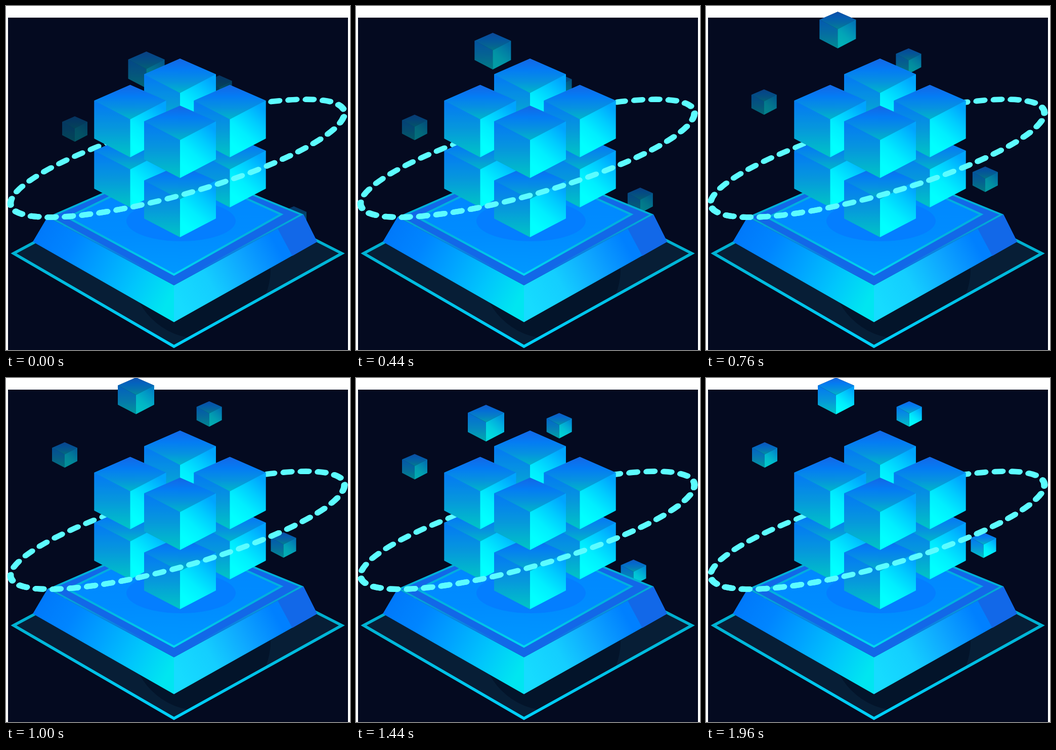
Animation, 680 px wide and 680 px high, one loop 2000 ms. Source, as an HTML page with a canvas:

```html
<!DOCTYPE html>
<html lang="en">
<head>
<meta charset="utf-8">
<title>Isometric cubes</title>
<style>
  html, body { margin: 0; width: 100%; height: 100%; overflow: hidden; background: #fff; }
  canvas { display: block; width: 680px; height: 680px; }
</style>
</head>
<body>
<canvas id="stage" width="680" height="680"></canvas>
<script>
const ctx = document.getElementById('stage').getContext('2d');
const LOOP = 2000, STEP = 40, HALF = 1000;
const NIGHT = '#040a20', HAZE = '#042438', TEAL = '#00b2d6', ROYAL = '#1268e8';

const clamp = v => Math.max(0, Math.min(1, v));
const mix = (a, b, p) => a + (b - a) * p;

function trace(points) {
  ctx.beginPath();
  points.forEach(([x, y]) => ctx.lineTo(x, y));
  ctx.closePath();
}

function fill(points, paint) {
  trace(points);
  ctx.fillStyle = paint;
  ctx.fill();
}

function outline(points, paint, width) {
  trace(points);
  ctx.strokeStyle = paint;
  ctx.lineWidth = width;
  ctx.stroke();
}

// Round patch that stays inside a polygon
function patch(points, x, y, rx, ry, color) {
  ctx.save();
  trace(points);
  ctx.clip();
  ctx.beginPath();
  ctx.ellipse(x, y, rx, ry, 0, 0, 2 * Math.PI);
  ctx.fillStyle = color;
  ctx.fill();
  ctx.restore();
}

// Evenly spaced colours along a line
function grad(x0, y0, x1, y1, ...colors) {
  const g = ctx.createLinearGradient(x0, y0, x1, y1);
  colors.forEach((c, i) => g.addColorStop(i / (colors.length - 1), c));
  return g;
}

// Half width, half heights of the top face, side height
const W = 71, BACK = 31, MID = 68, SIDE = 75;

// (x, y) is the topmost corner
function cube(x, y, scale, alpha, under) {
  const left = [-W, BACK], right = [W, BACK], mid = [0, MID];
  const down = ([px, py]) => [px, py + SIDE];
  ctx.save();
  ctx.translate(x, y);
  ctx.scale(scale, scale);
  fill([[0, 0], right, down(right), down(mid), down(left), left], under);
  ctx.globalAlpha = alpha;
  fill([[0, 0], right, mid, left],
    grad(0, 0, 0, MID, '#1466e6', '#047cf4', '#0692e0', '#00b6c8'));
  fill([left, mid, down(mid), down(left)],
    grad(0, 38, 0, 136, '#047cf2', '#0698dc', '#00c0c8'));
  fill([mid, right, down(right), down(mid)],
    grad(12, 122, 72, 52, '#00ffff', '#00eeff', '#00ccff', '#00a4ff'));
  ctx.restore();
}

// Two layers of two by two, drawn from the back and from below
function drawBlocks() {
  for (let level = 1; level >= 0; level--)
    for (let i = 0; i < 2; i++)
      for (let j = 0; j < 2; j++) {
        const near = i * j;
        const y = 104 + 52 * (i + j) - 11 * near + level * (99 + 18 * near);
        cube(344 + 98.5 * (j - i), y, 1, 1, '#0098e0');
      }
}

const FLOATS = [
  { x: 257, y: -1, scale: 0.507, from: 0.42, to: 1, path: glide },
  { x: 401.7, y: 46, scale: 0.352, from: 0.22, to: 1, path: lift },
  { x: 116, y: 127, scale: 0.352, from: 0.22, to: 0.75, path: lift },
  { x: 548.5, y: 305, scale: 0.352, from: 0.25, to: 1, path: glide }
];
const DEPTH = 91;

const slide = t => 23 * (1 - clamp((t - HALF) / 270) ** 2);

// Eased rise towards the resting place
function glide(t) {
  const second = t > HALF;
  const p = (1 - Math.cos(Math.PI * (second ? t - HALF : t) / HALF)) / 2;
  const x = second ? slide(t) : 20.5 * (1 - p) + 5 * p * (1 - p);
  return [x, DEPTH * (1 - p)];
}

// Steady rise towards the resting place
function lift(t) {
  if (t > HALF) return [slide(t), DEPTH * (1 - clamp((t - HALF) / 590))];
  const p = clamp((t - 420) / 580);
  return [20 * (1 - clamp(t / 430)) - 1.3 * Math.sin(Math.PI * p), DEPTH * (1 - p)];
}

function drawFloats(t) {
  for (const f of FLOATS) {
    const [dx, dy] = f.path(t);
    cube(f.x + dx, f.y + dy, f.scale, mix(f.from, f.to, t / LOOP), HAZE);
  }
}

const diamond = (left, right, top, bottom) => [left, [332, top], right, [332, bottom]];
const FLOOR = diamond([15, 489], [664, 489], 320, 673);
const RIM = diamond([82, 417], [588, 412], 308, 552);
const DECK = diamond([122, 418], [544, 412], 316, 531);

function drawFloor() {
  fill(FLOOR, '#071e36');
  patch(FLOOR, 385, 520, 138, 138, '#03142a');
  outline(FLOOR, grad(0, 470, 0, 673, '#00b0d0', '#00d2fc'), 5.5);
}

function drawPlatform() {
  const [left, , right, front] = RIM;
  const footL = [53, 466], footR = [615, 466], footF = [332, 625];
  fill([footL, left, front, footF],
    grad(66, 438, 318, 588, '#0078fa', '#0085ff', '#00a4ff', '#00c6fc', '#00e6f0'));
  fill([footF, front, right, footR],
    grad(340, 588, 602, 440, '#16dcff', '#14ceff', '#0ea6ff', '#0080ff', '#007eff'));
  fill([right, footR, [566, 494], [537, 440]], ROYAL);

  fill(RIM, ROYAL);
  ctx.save();
  trace(RIM);
  ctx.clip();
  outline(RIM, grad(0, 412, 0, 530, TEAL, ROYAL), 7);
  ctx.restore();

  fill(DECK, grad(0, 370, 0, 530, '#0088ff', '#008cff', '#0098ff'));
  patch(DECK, 346, 425, 108, 40, '#047eff');
  outline(DECK, grad(0, 370, 0, 531, '#00aee0', '#00b4e0', '#00d8f0'), 4);
}

// The ring is a dashed ellipse, squashed together with its stroke
const RING = { x: 339, y: 301, a: 342.5, b: 87.8, squash: 0.82, tilt: -0.277, start: 4.504 };
const PITCH = 34.45, DASH = 15.5, LEAD = 13.1, SPEED = 0.059;

function drawRing(t, frontOnly) {
  ctx.save();
  ctx.translate(RING.x, RING.y);
  ctx.rotate(RING.tilt);
  ctx.scale(1, RING.squash);
  if (frontOnly) {
    ctx.beginPath();
    ctx.rect(-400, 0, 800, 150);
    ctx.clip();
  }
  ctx.beginPath();
  ctx.ellipse(0, 0, RING.a, RING.b, 0, RING.start, RING.start + 2 * Math.PI);
  ctx.setLineDash([DASH, PITCH - DASH]);
  ctx.lineDashOffset = DASH / 2 - LEAD - SPEED * t;
  ctx.lineCap = 'round';
  ctx.lineWidth = 13;
  ctx.strokeStyle = '#5cfcff';
  ctx.stroke();
  ctx.restore();
}

function draw(t) {
  ctx.fillStyle = '#fff';
  ctx.fillRect(0, 0, 680, 680);
  ctx.fillStyle = NIGHT;
  ctx.fillRect(4, 23, 672, 657);
  drawFloor();
  drawFloats(t);
  drawPlatform();
  drawRing(t, false);
  drawBlocks();
  drawRing(t, true);
}

const begin = performance.now();
function tick() {
  const t = (performance.now() - begin) % LOOP;
  draw(Math.floor(t / STEP) * STEP);
  requestAnimationFrame(tick);
}
tick();
</script>
</body>
</html>
```
